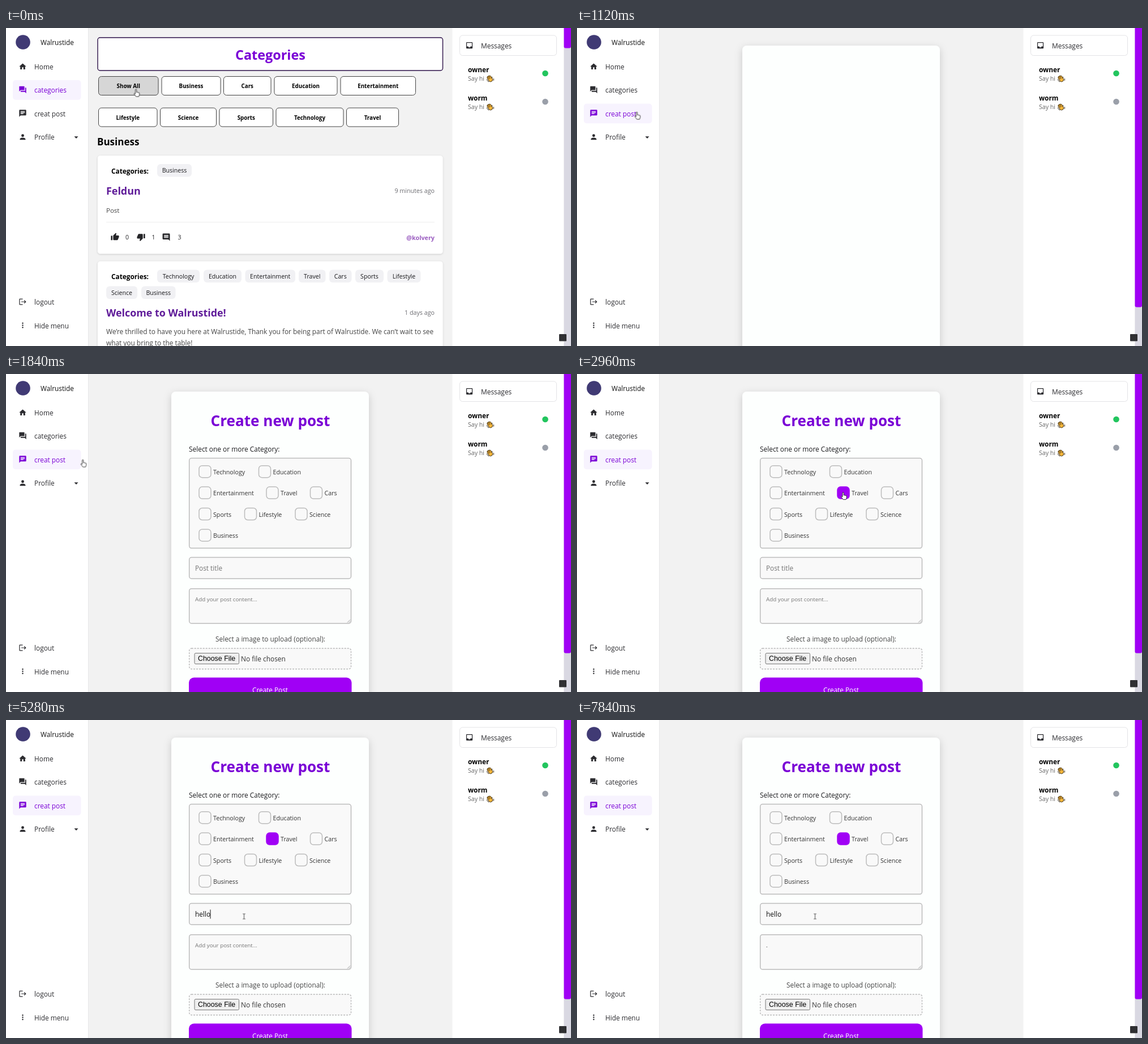
These frames come from a looping animation (998 px wide and 561 px high, 8000 ms). An HTML page:

```html
<!DOCTYPE html>
<html lang="en">
<head>
<meta charset="utf-8">
<style>
html, body { margin: 0; width: 100%; height: 100%; overflow: hidden; background: #f2f2f2; }
svg { display: block; width: 100vw; height: 100vh; }
text { font-family: "Open Sans", "Noto Sans", sans-serif; white-space: pre; }
</style>
</head>
<body>
<svg id="stage" viewBox="0 0 998 561" xmlns="http://www.w3.org/2000/svg">
  <defs>
    <filter id="lift" x="-20%" y="-20%" width="140%" height="140%">
      <feDropShadow dx="0" dy="4" stdDeviation="7" flood-opacity=".17"/>
    </filter>
    <filter id="soft" x="-5%" y="-10%" width="110%" height="120%">
      <feDropShadow dx="0" dy="1" stdDeviation="1" flood-opacity=".12"/>
    </filter>
  </defs>
</svg>
<script>
const LOOP = 8000;
const PURPLE = '#a000f5', VIOLET = '#7a00d6', INK = '#2c2c30';
const stage = document.getElementById('stage');

function add(parent, tag, attrs = {}, content) {
  const el = document.createElementNS('http://www.w3.org/2000/svg', tag);
  for (const key in attrs) el.setAttribute(key, attrs[key]);
  if (content !== undefined) el.textContent = content;
  parent.append(el);
  return el;
}
const group = (parent, attrs) => add(parent, 'g', attrs);
const box = (parent, x, y, right, bottom, r, fill, more) =>
  add(parent, 'rect', { x, y, width: right - x, height: bottom - y, rx: r, fill, ...more });
const line = (stroke, width = 1) => ({ stroke, 'stroke-width': width });
const label = (parent, x, y, size, str, more) =>
  add(parent, 'text', { x, y, 'font-size': size, ...more }, str);
const BOLD = { 'font-weight': 700 }, MID = { 'text-anchor': 'middle' }, END = { 'text-anchor': 'end' };

function play(el, prop, steps, easing = 'steps(1, end)') {
  const frames = steps.map(([t, value]) => ({ offset: t / LOOP, [prop]: value, easing }));
  frames.push({ offset: 1, [prop]: steps.at(-1)[1] });
  el.animate(frames, { duration: LOOP, iterations: Infinity });
}
const showFrom = (el, t) => play(el, 'opacity', [[0, 0], [t, 1]]);
const hideFrom = (el, t) => play(el, 'opacity', [[0, 1], [t, 0]]);
const fadeIn = (el, from, to) => play(el, 'opacity', [[0, 0], [from, 0], [to, 1]], 'linear');

const ICONS = {
  home: 'M10 20v-6h4v6h5v-8h3L12 3 2 12h3v8z',
  forum: 'M21 6h-2v9H6v2q0 1 1 1h11l4 4V7q0-1-1-1zm-4 6V3q0-1-1-1H3q-1 0-1 1v14l4-4h10q1 0 1-1z',
  chat: 'M20 2H4q-2 0-2 2v18l4-4h14q2 0 2-2V4q0-2-2-2zM6 9h12v2H6zm8 5H6v-2h8zm4-6H6V6h12z',
  person: 'M12 12a4 4 0 1 0 0-8 4 4 0 0 0 0 8zm0 2c-2.7 0-8 1.3-8 4v2h16v-2c0-2.7-5.3-4-8-4z',
  exit: 'M17 7l-1.4 1.4 2.6 2.6H8v2h10.2l-2.6 2.6L17 17l5-5zM4 5h8V3H4q-2 0-2 2v14q0 2 2 2h8v-2H4z',
  dots: 'M12 4a2 2 0 1 0 0 4 2 2 0 0 0 0-4zm0 6a2 2 0 1 0 0 4 2 2 0 0 0 0-4zm0 6a2 2 0 1 0 0 4 2 2 0 0 0 0-4z',
  inbox: 'M19 3H5q-2 0-2 2v14q0 2 2 2h14q2 0 2-2V5q0-2-2-2zm0 12h-4a3 3 0 0 1-6 0H5V5h14z',
  thumb: 'M1 21h4V9H1zm22-11q0-2-2-2h-6.3l1-4.6q0-.8-.5-1.4l-1-1-6.6 6.6Q7 8.200 7 9v10q0 2 2 2h9q1.300 0 1.800-1.200l3-7q.2-.3.2-.8z',
  comment: 'M22 4q0-2-2-2H4q-2 0-2 2v12q0 2 2 2h14l4 4zm-4 10H6v-2h12zm0-3H6V9h12zm0-3H6V6h12z'
};
const icon = (parent, name, cx, cy, size, turn = 0) => add(parent, 'path', {
  d: ICONS[name],
  transform: `translate(${cx} ${cy}) rotate(${turn}) scale(${size / 24}) translate(-12 -12)`
});

function card(parent, y, bottom) {
  box(parent, 161.5, y, 772, bottom, 5, '#fff', { ...line('#e8e8e8'), filter: 'url(#soft)' });
}
function tag(parent, x, right, y, str) {
  box(parent, x, y, right, y + 22.500, 6, '#f1f1f4');
  label(parent, (x + right) / 2, y + 15, 10.600, str, { ...MID, fill: '#17171a' });
}

function buildCategories() {
  const page = group(stage);
  box(page, 162, 17, 771.500, 75, 4, '#fff', line('#2c1148', 1.400));
  label(page, 467, 56, 23.400, 'Categories', { ...BOLD, ...MID, fill: VIOLET });
  const rows = [
    [85.500, [['Show All', 163.500, 269], ['Business', 275, 379], ['Cars', 384.500, 468],
      ['Education', 474, 585], ['Entertainment', 591, 723.500]]],
    [141, [['Lifestyle', 163.500, 267], ['Science', 272.500, 371.500], ['Sports', 377, 471.500],
      ['Technology', 477, 596], ['Travel', 601.500, 693.500]]]
  ];
  for (const [y, buttons] of rows) for (const [name, x, right] of buttons) {
    const face = box(page, x, y, right, y + 33, 5, '#fff', line('#444'));
    label(page, (x + right) / 2, y + 20.800, 9.800, name, { ...BOLD, ...MID });
    if (name === 'Show All')
      play(face, 'fill', [[0, '#d6d6d6'], [160, '#d6d6d6'], [400, '#fff']], 'linear');
  }
  label(page, 161, 207, 17, 'Business', BOLD);

  card(page, 224.500, 398.500);
  label(page, 186, 256.500, 11.800, 'Categories:', BOLD);
  tag(page, 267, 328, 240, 'Business');
  label(page, 177, 294, 17.900, 'Feldun', { ...BOLD, fill: '#5f1b99' });
  label(page, 757, 291, 10.700, '9 minutes ago', { ...END, fill: '#6b6b70' });
  label(page, 177, 326, 11.500, 'Post', { fill: '#444' });
  add(page, 'path', { d: 'M177 342.500H757', stroke: '#ededed' });
  const votes = group(page, { fill: '#252528' });
  icon(votes, 'thumb', 192.500, 368.500, 15.500);
  icon(votes, 'thumb', 238.500, 369, 15.500, 180);
  icon(votes, 'comment', 283, 369, 15.500);
  [[211, '0'], [257.500, '1'], [303.500, '3']].forEach(([x, n]) => label(votes, x, 373, 10.500, n));
  label(page, 757, 373.500, 10.800, '@kolvery', { ...BOLD, ...END, fill: '#9a5cc0' });

  card(page, 411, 590);
  label(page, 186, 443, 11.800, 'Categories:', BOLD);
  [['Technology', 267, 342], ['Education', 349, 416], ['Entertainment', 422.500, 511],
    ['Travel', 517, 564.500], ['Cars', 571, 610.500], ['Sports', 617, 667], ['Lifestyle', 673.500, 732.500]]
    .forEach(([name, x, right]) => tag(page, x, right, 426.500, name));
  tag(page, 177, 232, 455.500, 'Science');
  tag(page, 239, 299.500, 455.500, 'Business');
  label(page, 177, 508.500, 17.900, 'Welcome to Walrustide!', { ...BOLD, fill: '#5f1b99' });
  label(page, 757, 505.500, 10.700, '1 days ago', { ...END, fill: '#6b6b70' });
  ['We’re thrilled to have you here at Walrustide, Thank you for being part of Walrustide. We can’t wait to see',
    'what you bring to the table!']
    .forEach((str, i) => label(page, 177, 539.500 + 20 * i, 11.860, str, { fill: '#444' }));
  hideFrom(page, 1120);
}

function buildForm() {
  const page = group(stage);
  showFrom(page, 1120);
  box(page, 292, 31, 641, 640, 8, '#fdfffe', { filter: 'url(#lift)' });
  const title = label(page, 467, 92, 26.100, 'Create new post', { ...BOLD, ...MID, fill: VIOLET });
  fadeIn(title, 1280, 1600);

  const form = group(page);
  fadeIn(form, 1120, 1376);
  const edge = line('#bcbcbc', 1.500), face = '#f9f9f9', grey = '#757575';
  label(form, 323, 136.500, 11.900, 'Select one or more Category:', { fill: '#1c1c1f' });
  box(form, 323.700, 148.500, 609.500, 307.300, 4, face, edge);
  const rows = [
    [['Technology', 341], ['Education', 446.500]],
    [['Entertainment', 341], ['Travel', 460], ['Cars', 537.500]],
    [['Sports', 341], ['Lifestyle', 421.500], ['Science', 511]],
    [['Business', 341]]
  ];
  rows.forEach((row, i) => row.forEach(([name, x]) => {
    const y = 161.700 + 37.400 * i;
    const check = box(form, x, y, x + 21, y + 21, 5.500, face, edge);
    label(form, x + 25, y + 15, 10.700, name, { fill: '#333' });
    if (name === 'Travel') {
      play(check, 'fill', [[0, face], [2720, PURPLE]]);
      play(check, 'stroke', [[0, '#bcbcbc'], [2720, PURPLE]]);
    }
  }));

  box(form, 323.700, 323.500, 609.500, 361, 4, face, edge);
  hideFrom(label(form, 334, 347.300, 11.800, 'Post title', { fill: grey }), 4560);
  const typed = label(form, 334, 347.300, 11.900, '', { fill: '#111' });
  [['h', 4560], ['e', 4640], ['ll', 4720], ['o', 4800]].forEach(([str, t]) =>
    play(add(typed, 'tspan', {}, str), 'fillOpacity', [[0, 0], [t, 1]]));

  box(form, 323.700, 378.700, 609.500, 440, 4, face, edge);
  add(form, 'path', { d: 'M603 438.500l5-5m-2 5l2-2', stroke: '#777', 'stroke-width': .7 });
  hideFrom(label(form, 334, 400.500, 9.800, 'Add your post content...', { fill: grey }), 7280);
  showFrom(label(form, 334, 400.500, 9.800, '.', { fill: '#111' }), 7280);

  label(form, 467, 472, 11.850, 'Select a image to upload (optional):', { ...MID, fill: '#444' });
  box(form, 323.700, 484, 609.500, 520.500, 4, face, { ...line('#b8b8b8', 1.300), 'stroke-dasharray': '3 2' });
  box(form, 333, 492.500, 411.500, 511.500, 2, '#efefef', line('#777'));
  add(form, 'text', { x: 339, y: 506.300, 'font-size': 12.400, style: 'font-family:"Liberation Sans",Arial,sans-serif' }, 'Choose File');
  label(form, 415, 506.500, 11.900, 'No file chosen', { fill: '#333' });
  box(form, 323, 535.500, 610.500, 580, 9, PURPLE);
  label(form, 466.500, 561.500, 11.750, 'Create Post', { ...MID, fill: '#fff' });

  const caret = add(page, 'path', { d: 'M0 0V16', stroke: '#111', 'stroke-width': 1 });
  play(caret, 'transform', [[0, 334.500, 334.500, 1], [4560, 341.800, 334.500, 1], [4640, 348.500, 334.500, 1],
    [4720, 354.500, 334.500, 1], [4800, 361, 334.500, 1], [6240, 334.500, 389.500, .85], [7280, 337, 389.500, .85]]
    .map(([t, x, y, s]) => [t, `translate(${x}px, ${y}px) scaleY(${s})`]));
  play(caret, 'opacity', [[0, 0], [4000, 1], [5330, 0], [5840, 1], [6800, 0], [7280, 1], [7840, 0]]);
}

function buildSidebar() {
  box(stage, 0, 0, 146, 561, 0, '#e6e6e8');
  box(stage, 0, 0, 145, 561, 0, '#fff');
  add(stage, 'circle', { cx: 30, cy: 25, r: 12.800, fill: '#403a74' });
  label(stage, 61, 30, 11.800, 'Walrustide', { fill: '#111' });
  const items = [['home', 'Home', 68.500], ['forum', 'categories', 109.500], ['chat', 'creat post', 151],
    ['person', 'Profile', 192.800], ['exit', 'logout', 483.500], ['dots', 'Hide menu', 525]];
  const lit = { forum: [[0, 1], [900, 0]], chat: [[0, 0], [800, 1]] };
  for (const [name, str, y] of items) {
    const item = group(stage, { fill: INK });
    if (lit[name]) {
      play(box(item, 12, y - 17.500, 132.500, y + 17.300, 5, '#f7f3fe'), 'opacity', lit[name]);
      play(item, 'fill', lit[name].map(([t, on]) => [t, on ? VIOLET : INK]));
    }
    icon(item, name, 29.500, y - .5, 14.800);
    label(item, 50, y + 4.500, 11.850, str);
  }
  add(stage, 'path', { d: 'M120.500 191.300h7l-3.500 3.600z', fill: INK });
}

function buildMessages() {
  box(stage, 788.500, 0, 985.500, 561, 0, '#fff');
  box(stage, 801.500, 13, 972.500, 48.500, 5, '#fff', line('#e3e3e6'));
  icon(group(stage, { fill: INK }), 'inbox', 818.500, 30.500, 15);
  label(stage, 839, 35.700, 11.900, 'Messages', { fill: INK });
  [['owner', 73.500, '#22c55e'], ['worm', 123.500, '#9a9fa9']].forEach(([name, y, tone]) => {
    label(stage, 816, y + 4.500, 11.800, name, BOLD);
    label(stage, 816, y + 19.500, 10.600, 'Say hi', { fill: '#666' });
    const wave = group(stage, { transform: `translate(855 ${y + 16}) rotate(-32)`, fill: '#f8b83c', ...line('#3a2a10', .9) });
    box(wave, -3.700, -5.600, 3.400, 5.200, 3, '#f8b83c');
    add(wave, 'path', { d: 'M-1.500-5V0M.8-5V0M3 1l2.200-1.800', fill: 'none' });
    add(wave, 'path', { d: 'M-5.400-2.500q-1 3 .6 6M5.500 3q-.5 2-2 3', fill: 'none' });
    add(stage, 'circle', { cx: 952.500, cy: y + 6.500, r: 5.300, fill: tone });
  });
  box(stage, 985.500, 0, 998, 561, 0, '#d9d8e2');
  hideFrom(box(stage, 985.500, -4, 998, 35.500, 3, PURPLE), 1120);
  showFrom(box(stage, 985.500, -4, 998, 492.500, 3, PURPLE), 1120);
  box(stage, 977, 540, 990, 552.500, 1, '#303033');
}

function buildPointer() {
  const pointer = group(stage);
  const skin = { fill: '#fff', ...line('#222', .9), 'stroke-linejoin': 'round' };
  const hand = add(pointer, 'path', { ...skin,
    d: 'M-1 1.200q0-1.500 1.100-1.500T1.200 1.200V5q1-.7 1.900.2 1-.5 1.700.4 1.400-.4 1.400 1.200V9.500L5 12.500H.2L-3 8.200q-.7-1.500.5-1.600L-1 7.700z' });
  const arrow = add(pointer, 'path', { ...skin, d: 'M0 0V11l2.600-2.400 1.700 4 1.800-.8-1.700-3.800H8z' });
  const beam = add(pointer, 'path', { fill: 'none', ...line('#333', .9),
    d: 'M-2.200-4.500H-.7L0-4 .7-4.500H2.200M0-4V4M-2.200 4.500H-.7L0 4 .7 4.500H2.200' });
  play(hand, 'opacity', [[0, 1], [320, 0], [600, 1], [1920, 0], [2400, 1], [3520, 0]]);
  play(arrow, 'opacity', [[0, 0], [320, 1], [600, 0], [1920, 1], [2400, 0], [3520, 1], [3680, 0]]);
  play(beam, 'opacity', [[0, 0], [3680, 1]]);
  play(pointer, 'transform', [[0, 229.500, 108.500], [80, 229.500, 108.500], [800, 105.500, 148.500],
    [1700, 105.500, 148.500], [1840, 135.500, 151.500], [2560, 470, 209], [3360, 470, 209],
    [3840, 428.500, 346.500], [4240, 428.500, 346.500], [4400, 420.500, 346.500]]
    .map(([t, x, y]) => [t, `translate(${x}px, ${y}px)`]), 'ease-in-out');
}

buildCategories();
buildForm();
buildSidebar();
buildMessages();
buildPointer();
</script>
</body>
</html>
```
